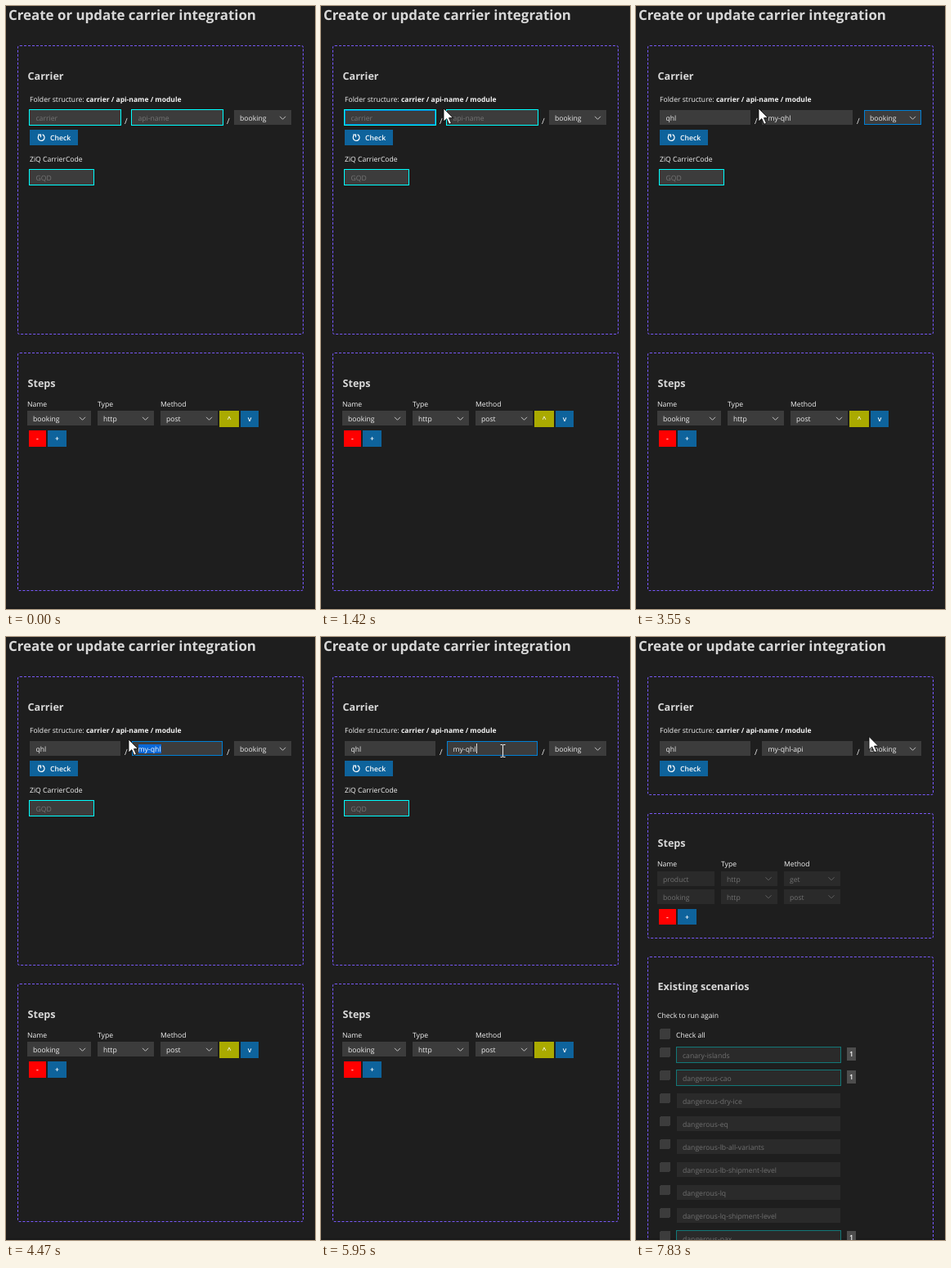
Animation of 378x736 px, one loop 8000 ms. Source, as an HTML page:

```html
<!DOCTYPE html>
<html lang="en">
<head>
<meta charset="utf-8">
<title>Carrier integration</title>
<style>
  html, body { margin: 0; width: 100%; height: 100%; overflow: hidden; background: #1e1e1e; }
  svg { display: block; width: 100%; height: 100%; }
  text {
    font: 8.65px "Open Sans", "Noto Sans", sans-serif;
    fill: #ececec; text-rendering: geometricPrecision; white-space: pre;
  }
  rect { shape-rendering: crispEdges; }
  .h1 { font-size: 16.9px; font-weight: 700; fill: #d8d8d8; }
  .h2 { font-size: 12.6px; font-weight: 700; fill: #d8d8d8; }
  .strong { font-size: 8.5px; font-weight: 700; }
  .label { fill: #f4f4f4; }
  .button { fill: #fff; font-weight: 600; }
  .mid { text-anchor: middle; }
  .hint { fill: #757575; }
  .dim { fill: #707070; }
  .slash { font-size: 10px; }
  .panel { box-sizing: border-box; height: 100%; border: 1px dashed #7858ff; border-radius: 3px; }
  .line { fill: none; stroke: #c5c5c5; }
  .faded { stroke: #606060; }
  .ring { fill: none; stroke: #0ff; }
  .focus { fill: none; stroke: #007fd4; }
</style>
</head>
<body>
<svg id="stage" viewBox="0 0 378 736"></svg>
<script>
const LOOP = 8000, DONE = 7610;
const FIELD = '#3c3c3c', FIELD_DIM = '#2a2a2a', BLUE = '#0e639c', RED = '#f00';

const rect = (x, y, w, h, fill, extra = '') =>
  `<rect x="${x}" y="${y}" width="${w}" height="${h}" fill="${fill}" ${extra}/>`;
const frame = (x, y, w, h, cls, extra = '') =>
  `<rect class="${cls}" x="${x + .5}" y="${y + .5}" width="${w - 1}" height="${h - 1}" ${extra}/>`;
const text = (x, y, str, cls = '', extra = '') =>
  `<text x="${x}" y="${y}" class="${cls}" ${extra}>${str}</text>`;
const panel = (y, h) =>
  `<foreignObject x="14" y="${y}" width="350" height="${h}"><div class="panel"></div></foreignObject>`;
const button = (x, y, w, str, fill, h = 20) =>
  rect(x, y, w, h, fill) + text(x + w / 2, y + 13, str, 'button mid');
const chevron = (x, y, cls = '') =>
  `<path class="line ${cls}" d="M${x - 3.5} ${y - 1.7}l3.5 3.5l3.5 -3.5"/>`;
const select = (x, y, w, str) =>
  rect(x, y, w, 18, FIELD) + text(x + 7, y + 13, str) + chevron(x + w - 10.5, y + 9.5);
const dimField = (x, y, w, str) =>
  rect(x, y, w, 18, FIELD_DIM) + text(x + 7, y + 12.7, str, 'dim');
const dimSelect = (x, y, w, str) =>
  dimField(x, y, w, str) + chevron(x + w - 11, y + 9, 'faded');

// Text field with required ring, placeholder, focus border, selection and caret
const input = (id, x, y, w, hint) => `<g id="${id}">
  ${rect(x, y, w, 18, FIELD)}
  ${frame(x - 1, y - 1, w + 2, 20, 'ring')}${frame(x, y, w, 18, 'focus')}
  ${rect(x + 7.5, y + 4, 0, 11, '#0a68d8', 'class="selection"')}
  ${text(x + 7.5, y + 13, hint, 'hint')}${text(x + 7.5, y + 13, '', 'value')}
  ${rect(x + 8, y + 3, 1, 12, '#e0e0e0', 'class="caret"')}</g>`;

const header = text(3, 17, 'Create or update carrier integration', 'h1') +
  text(26.5, 90, 'Carrier', 'h2') +
  text(29, 117, 'Folder structure: <tspan class="strong">carrier / api-name / module</tspan>', 'label') +
  input('carrier', 29, 127, 111, 'carrier') + text(145, 144, '/', 'slash') +
  input('api', 154, 127, 111, 'api-name') + text(270, 144, '/', 'slash') +
  select(279, 127, 70, 'booking') + frame(279, 127, 70, 18, 'focus', 'id="module"') +
  rect(29, 151, 59, 19, BLUE) + text(54, 163.7, 'Check', 'button') +
  `<path fill="none" stroke="#fff" stroke-width="1.2" d="M44.6 156.9A3.9 3.9 0 1 1 40.2 158M39.3 157.2h3.2v3"/>`;

const steps = (x, y) => text(26, y, 'Name', 'label') +
  text(x[0], y, 'Type', 'label') + text(x[1], y, 'Method', 'label');
const addRemove = (y, h) => button(28, y, 21, '-', RED, h) + button(51, y, 23, '+', BLUE, h);

const draft = panel(48, 353) + text(29, 190, 'ZiQ CarrierCode', 'label') +
  rect(29, 200, 78, 18, FIELD) + frame(28, 199, 80, 20, 'ring') + text(36.5, 213, 'GQD', 'hint') +
  panel(423, 291) + text(26.5, 465, 'Steps', 'h2') + steps([112, 189], 489) +
  select(26, 494, 78, 'booking') + select(112, 494, 69, 'http') + select(189, 494, 70, 'post') +
  button(261, 494, 24, '^', '#aa0') + button(287, 494, 22, 'v', BLUE) + addRemove(518, 20);

const scenario = (name, i) => {
  const y = 501 + 28 * i, flagged = i < 2 || i === 8;
  return rect(29, y, 13, 12, FIELD, 'rx="2"') + dimField(50, y, 200, name) +
    (flagged ? frame(49, y - 1, 202, 20, 'ring', 'style="stroke:#127878"') +
      rect(258, y, 11, 16, '#4d4d4d', 'rx="1"') + text(263.5, y + 10.5, '1', 'button mid') : '');
};
const scenarios = ['canary-islands', ...['cao', 'dry-ice', 'eq', 'lb-all-variants',
  'lb-shipment-level', 'lq', 'lq-shipment-level', 'pax'].map(s => 'dangerous-' + s)];

const loaded = panel(48, 145) + panel(215, 153) + text(26.5, 256, 'Steps', 'h2') +
  steps([104, 181], 279.5) +
  [['product', 'get'], ['booking', 'post']].map(([name, method], i) => {
    const y = 286 + 22 * i;
    return dimField(26, y, 70, name) + dimSelect(104, y, 69, 'http') + dimSelect(181, y, 69, method);
  }).join('') + addRemove(332, 19) +
  panel(390, 400) + text(26.5, 431, 'Existing scenarios', 'h2') +
  text(26, 465, 'Check to run again', 'label') +
  rect(29, 478, 13, 13, FIELD, 'rx="2"') + text(49, 489, 'Check all', 'label') +
  scenarios.map(scenario).join('');

const stage = document.getElementById('stage');
stage.innerHTML = rect(0, 0, 378, 736, '#1e1e1e') + rect(0, 734, 378, 2, '#1a1a1a') +
  `<g id="draft">${draft}</g><g id="loaded">${loaded}</g>${header}
  <path id="arrow" fill="#fff" stroke="#000" stroke-width=".8" d="M0 0V16L3.8 12.6L6.8 19.3L9.4 18.1L6.5 11.6H11.5Z"/>
  <path id="beam" fill="none" stroke="#eee" d="M-3 -7.5h2.5l.5 .5l.5 -.5h2.5M0 -7V7M-3 7.5h2.5l.5 -.5l.5 .5h2.5"/>`;

// Timelines: [start, value]; each value holds until the next start
const typed = {
  carrier: [[0, ''], [1750, 'q'], [1820, 'qh'], [1880, 'qhl']],
  api: [[0, ''], [2350, 'm'], [2620, 'my'], [2750, 'my-'], [3150, 'my-q'], [3220, 'my-qh'],
    [3280, 'my-qhl'], [6620, 'my-qhl-'], [6820, 'my-qhl-a'], [6950, 'my-qhl-ap'], [7150, 'my-qhl-api']]
};
const focused = [[0, ''], [880, 'carrier'], [2150, 'api'], [3550, 'module'], [4470, 'api'], [DONE, '']];
const caretOn = [[0, 0], [880, 1], [1420, 0], [1750, 1], [3550, 0], [5680, 1], [6220, 0], [6620, 1], [DONE, 0]];
const selectedOn = [[0, 0], [4470, 1], [5680, 0]];

const entry = Array.from({ length: 10 }, (_, i) => {
  const k = 1 - (1 - i / 10) ** 1.6;
  return [Math.round(70 + 66 * i), ['arrow', 344 - 243 * k, 715 - 587 * k]];
});
const pointer = [[0, ['none', 0, 0]], ...entry,
  [730, ['beam', 101.5, 136]], [800, ['beam', 89.5, 132]],
  [960, ['beam', 122.5, 131]], [1040, ['arrow', 150, 125]],
  [4940, ['arrow', 151, 118]], [5010, ['arrow', 155, 109]], [5070, ['arrow', 163, 105]],
  [5140, ['arrow', 174, 112]], [5210, ['arrow', 184, 124]], [5280, ['arrow', 190, 146]],
  [5410, ['beam', 210.5, 139]], [5480, ['beam', 217.5, 132]], [5750, ['beam', 219.5, 136]],
  [5950, ['beam', 222.5, 139]], [7830, ['arrow', 285, 121.5]]];

const at = (line, t) => line.findLast(([start]) => start <= t)[1];
const show = (el, on) => el.setAttribute('visibility', on ? 'visible' : 'hidden');
const byId = id => document.getElementById(id);

function renderInput(id, t) {
  const part = cls => byId(id).querySelector('.' + cls);
  const str = at(typed[id], t), active = at(focused, t) === id;
  const value = part('value'), selected = active && at(selectedOn, t);
  if (value.textContent !== str) value.textContent = str;
  const width = str ? Math.round(value.getComputedTextLength()) : 0;
  value.style.fill = selected ? '#fff' : '';
  show(part('ring'), !str);
  show(part('hint'), !str);
  show(part('focus'), active);
  show(part('selection'), selected);
  show(part('caret'), active && at(caretOn, t));
  part('selection').setAttribute('width', width);
  part('caret').setAttribute('transform', `translate(${width})`);
}

function render(t) {
  const done = t >= DONE;
  byId('draft').style.display = done ? 'none' : '';
  byId('loaded').style.display = done ? '' : 'none';
  show(byId('module'), at(focused, t) === 'module');
  renderInput('carrier', t);
  renderInput('api', t);
  const [shape, x, y] = at(pointer, t);
  for (const id of ['arrow', 'beam']) {
    show(byId(id), shape === id);
    byId(id).setAttribute('transform', `translate(${x} ${y})`);
  }
}

const origin = performance.now();
function tick() {
  render((performance.now() - origin) % LOOP);
  requestAnimationFrame(tick);
}
tick();
</script>
</body>
</html>
```
